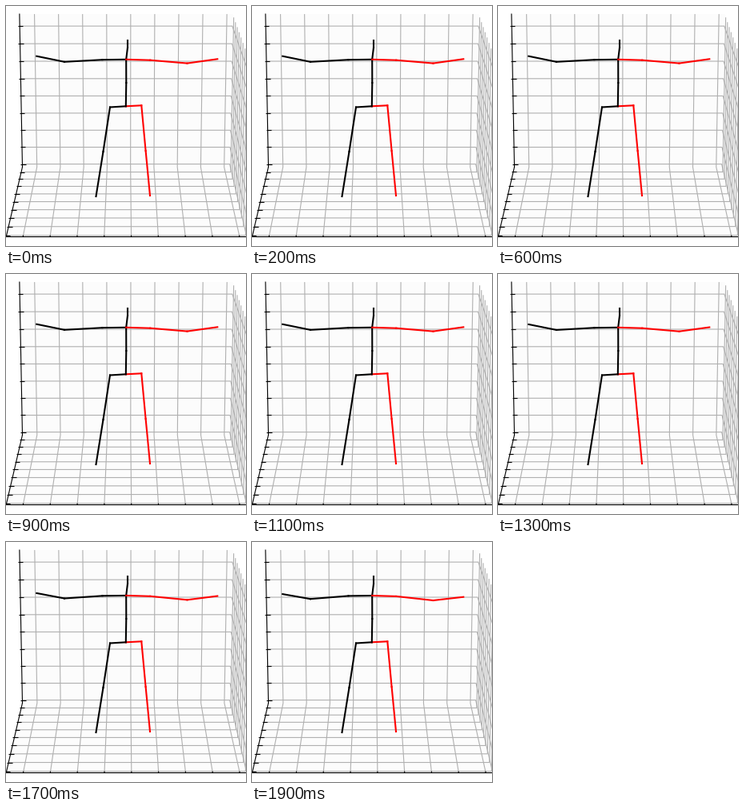
Recreate the animation shown at these times as a matplotlib script. Size 300x300 px, loop 2 s.

```python
import numpy as np
import matplotlib.pyplot as plt
from matplotlib.animation import FuncAnimation

SIZE, FRAMES = 300, 20
ELEV = np.radians(15)
DIST, SCALE = 7.5, 1850
CX, CY = 150, 141
HALF = 4.427           # half width of the room, in grid cells
CELL = 0.12908         # one grid cell in view units
ZCELL = CELL * 0.75
TICK_OUT, TICK_IN = 0.0708, 0.1417

fig = plt.figure(figsize=(3, 3), dpi=100, facecolor="white")
ax = fig.add_axes([0, 0, 1, 1])
ax.set_xlim(0, SIZE)
ax.set_ylim(SIZE, 0)
ax.axis("off")


def project(points):
    """Room cells (right, toward viewer, up) to stage pixels."""
    x, y, z = np.array(points, float).T * np.array([[CELL], [CELL], [ZCELL]])
    depth = DIST - (y * np.cos(ELEV) + z * np.sin(ELEV))
    up = z * np.cos(ELEV) - y * np.sin(ELEV)
    return CX + SCALE * x / depth, CY - SCALE * up / depth


def stroke(color, width, **kw):
    return ax.plot([], [], color=color, lw=width, **kw)[0]


def wall(*corners):
    ax.fill(*project(corners), color="#fcfcfc", lw=0, zorder=0)


h = HALF
wall((-h, -h, -h), (h, -h, -h), (h, -h, h), (-h, -h, h))
wall((h, -h, -h), (h, h, -h), (h, h, h), (h, -h, h))
wall((-h, -h, -h), (h, -h, -h), (h, h, -h), (-h, h, -h))


def grid_line():
    return stroke("#b0b0b0", 0.8, solid_capstyle="butt", zorder=1)


def tick_line():
    return stroke("black", 0.8, solid_capstyle="butt", zorder=2)


x_grid, x_ticks = [[f() for _ in range(9)] for f in (grid_line, tick_line)]
y_grid, y_ticks = [[f() for _ in range(9)] for f in (grid_line, tick_line)]

# height lines never move
for k in range(9):
    z = k - 4.25
    grid_line().set_data(*project([(-h, -h, z), (h, -h, z), (h, h, z)]))
    tick_line().set_data(*project([(-h - TICK_OUT, -h, z),
                                   (-h + TICK_IN, -h, z)]))

for a, b in [((-h, -h, -h), (-h, -h, h)),
             ((-h, -h, -h), (-h, h, -h)),
             ((-h, h, -h), (h, h, -h))]:
    stroke("black", 0.8, zorder=2).set_data(*project([a, b]))

# joint: x, y, how far it sinks
JOINTS = {
    "root": (149.8, 125.3, 0), "spine": (150.3, 96, 0),
    "chest": (150.2, 66.8, 0.2), "neck": (152, 52, 0.3),
    "head": (152, 42.5, 0.4),
    "hip_l": (130, 126.5, 0), "knee_l": (121.5, 182, 0),
    "foot_l": (112.5, 238, 0),
    "hip_r": (169.3, 124.3, 0), "knee_r": (174.6, 181, 0),
    "foot_r": (180, 237, 0),
    "shoulder_l": (120.5, 67.2, 0.2), "elbow_l": (73, 69.8, 1.4),
    "hand_l": (38.3, 62.7, 2.4),
    "shoulder_r": (180.3, 67.7, 0.2), "elbow_r": (226.5, 71.6, 1.4),
    "hand_r": (264.3, 66.3, 2.4),
}
CHAINS = [
    ("root hip_l knee_l foot_l", "black"),
    ("root hip_r knee_r foot_r", "red"),
    ("root spine chest neck head", "black"),
    ("chest shoulder_l elbow_l hand_l", "black"),
    ("chest shoulder_r elbow_r hand_r", "red"),
]
bones = []
for chain, color in CHAINS:
    names = chain.split()
    for pair in zip(names, names[1:]):
        bones.append((pair, stroke(color, 1.5, zorder=3)))


def draw(i):
    p = i / (FRAMES - 1)
    x0 = -3.806 + 0.009 * p
    y0 = -3.7 - 0.015 * (1 - (1 - p) ** 3)
    for k in range(9):
        x, y = x0 + k, y0 + k
        x_grid[k].set_data(*project([(x, h, -h), (x, -h, -h), (x, -h, h)]))
        x_ticks[k].set_data(*project([(x, h + TICK_OUT, -h),
                                      (x, h - TICK_IN, -h)]))
        y_grid[k].set_data(*project([(-h, y, -h), (h, y, -h), (h, y, h)]))
        y_ticks[k].set_data(*project([(-h - TICK_OUT, y, -h),
                                      (-h + TICK_IN, y, -h)]))
    sink = p ** 6
    for pair, line in bones:
        ends = [JOINTS[n] for n in pair]
        line.set_data([e[0] for e in ends], [e[1] + e[2] * sink for e in ends])
    return []


anim = FuncAnimation(fig, draw, frames=FRAMES, interval=100,
                     init_func=lambda: draw(0), repeat=True, repeat_delay=0)
plt.show()
```
